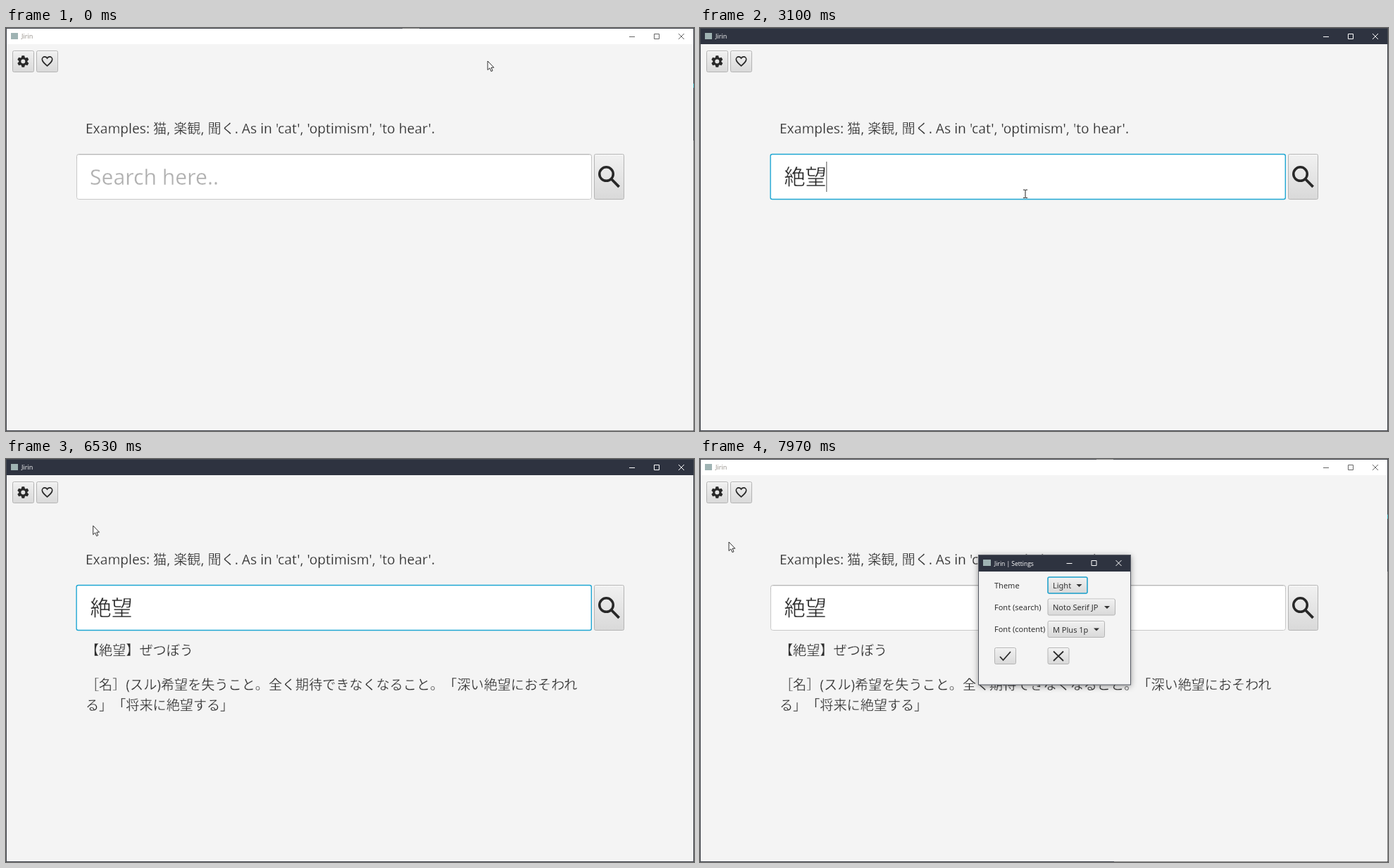
An HTML page that plays this animation: 977 by 573 pixels, repeating every 8 s.

```html
<!DOCTYPE html>
<html lang="en">
<head>
<meta charset="utf-8">
<title>Jirin</title>
<style>
  html, body { margin: 0; width: 100%; height: 100%; overflow: hidden; background: #f4f4f4; }
  svg { display: block; }
  text {
    font-family: "Noto Sans", "Noto Sans CJK JP", "Noto Sans CJK", sans-serif;
    font-weight: 350;
    fill: #2b2b2b;
    white-space: pre;
    text-spacing-trim: space-all;
  }
  /* A thin outline in the background colour makes the strokes finer. */
  .body { font-size: 19.12px; stroke: #f4f4f4; stroke-width: .3px; }
  .field { font-size: 30px; stroke: #fff; stroke-width: .4px; }
  .title { font: 9px "Open Sans", sans-serif; }
  .ui { font-size: 11px; font-weight: 400; fill: #333; }
  .glyph { fill: none; stroke: #282828; }
</style>
</head>
<body>
<svg id="stage" width="977" height="573" viewBox="0 0 977 573" lang="ja">
  <defs>
    <linearGradient id="face" x2="0" y2="1"><stop stop-color="#f1f1f1"/><stop offset="1" stop-color="#d9d9d9"/></linearGradient>
    <linearGradient id="lit" x2="0" y2="1"><stop stop-color="#fdfdfd"/><stop offset="1" stop-color="#ececec"/></linearGradient>
    <linearGradient id="pressed" x2="0" y2="1"><stop stop-color="#d2d2d2"/><stop offset="1" stop-color="#c4c4c4"/></linearGradient>
    <linearGradient id="edge" x2="0" y2="1"><stop stop-color="#b6b6b6"/><stop offset=".15" stop-color="#c8c8c8"/><stop offset="1" stop-color="#c8c8c8"/></linearGradient>
    <filter id="shadow" x="-10%" y="-10%" width="120%" height="125%"><feDropShadow dx="0" dy="2" stdDeviation="4" flood-opacity=".4"/></filter>
  </defs>
</svg>
<script>
const LOOP = 8000, FOCUS = 530, COMMIT = 3100, RESULT = 5130, PRESS = 7600, OPEN = 7670;
const DARK = "#2e3340", BLUE = "#1fa6d2";

const rect = (x, y, w, h, attrs = "") => `<rect x="${x}" y="${y}" width="${w}" height="${h}" ${attrs}/>`;
const path = (d, attrs = "") => `<path d="${d}" ${attrs}/>`;
const text = (x, y, cls, s, attrs = "") => `<text x="${x}" y="${y}" class="${cls}" ${attrs}>${s}</text>`;
const group = (id, s, attrs = "") => `<g id="${id}" ${attrs}>${s}</g>`;

const button = (x, y, w, h, id = "", stroke = "#b4b4b4") =>
  rect(x + .5, y + .5, w - 1, h - 1, `rx="2" fill="url(#face)" stroke="${stroke}" ${id && `id="${id}"`}`) +
  path(`M${x + 2} ${y + 1.5}h${w - 4}`, 'stroke="#fff" stroke-opacity=".7"');

// Minimise, maximise and close signs; x, y is the centre of the middle one.
const controls = (x, y, color) => path(
  `M${x - 39} ${y + .5}h8M${x - 3.5} ${y - 3.5}h7v7h-7zM${x + 31} ${y - 4}l8 8m0-8l-8 8`,
  `fill="none" stroke="${color}"`);

const titleBar = (id, bg, fg, sign) => group(id,
  rect(0, 0, 977, 23, `fill="${bg}"`) + rect(7, 7, 10, 9, 'fill="#9fb3b3"') +
  text(22, 15, "title", "Jirin", `style="fill:${fg}"`) + controls(924, 12, sign));

const gear = () => {
  const teeth = [0, 1, 2, 3, 4, 5].map(i =>
    path("M-2.7-5L-1.8-8.2H1.8L2.7-5z", `fill="#282828" transform="rotate(${i * 60})"`)).join("");
  return group("gear", '<circle r="4.5" class="glyph" stroke-width="3"/>' + teeth, 'transform="translate(24.3 47.5)"');
};

const heart = path(
  "M12 20.2C5.4 14.3 3 12 3 8.5A4.5 4.5 0 0 1 7.5 4C9.2 4 11 5 12 6.6 13 5 14.8 4 16.5 4A4.5 4.5 0 0 1 21 8.5C21 12 18.6 14.3 12 20.2Z",
  'class="glyph" stroke-width="2" transform="translate(48.9 37.7) scale(.8)"');

const lens = '<circle cx="852.5" cy="207.6" r="9.75" class="glyph" stroke-width="3.5"/>' +
  path("M859.4 214.5L870.6 225.8", 'class="glyph" stroke-width="3.8"');

const combo = (y, w, label, stroke) =>
  button(493.5, y, w, 24, "", stroke) + text(501, y + 16.5, "ui", label) +
  path(`M${493.5 + w - 16} ${y + 10.5}h8l-4 4z`, 'fill="#333"');

const dialog = group("dialog",
  rect(395, 136, 217, 185, 'fill="#f4f4f4" filter="url(#shadow)"') +
  rect(395, 136, 217, 24, `fill="${DARK}"`) +
  rect(395.5, 136.5, 216, 184.5, 'fill="none" stroke="#555963"') +
  rect(402, 143, 11, 9, 'fill="#9fb3b3"') +
  text(418, 151.5, "title", "Jirin | Settings", 'style="fill:#fff;font-size:8.5px"') +
  controls(559.5, 148, "#fff") +
  text(418, 184, "ui", "Theme") + text(418, 215, "ui", "Font (search)") + text(418, 246, "ui", "Font (content)") +
  combo(167.5, 57, "Light") + rect(494, 168, 56, 23, `rx="2" fill="none" stroke="${BLUE}" stroke-width="1.5"`) +
  combo(198.5, 96.5, "Noto Serif JP") + combo(230, 81.5, "M Plus 1p") +
  button(418, 268, 31, 24) + button(493.5, 268, 31, 24) +
  path("M426 281l4.5 5 10.5-12", 'class="glyph" stroke-width="1.8"') +
  path("M502 273.5l14 13.5m0-13.5l-14 13.5", 'class="glyph" stroke-width="1.8"'));

const stage = document.getElementById("stage");
stage.insertAdjacentHTML("beforeend",
  rect(0, 0, 977, 573, 'fill="#f4f4f4"') +
  titleBar("idleBar", "#fff", "#8f8982", "#666") + titleBar("activeBar", DARK, "#fff", "#fff") +
  rect(.5, .5, 976, 572, 'fill="none" stroke="#454850"') +
  group("idleEdge", path("M563 .5h24M588 572.5h388M976.5 160v412", 'stroke="#858585"') +
    path("M976.5 79v6", 'stroke="#36a9b5"')) +
  path("M0 572.5h83", 'stroke="#8d9097" id="imeEdge"') +
  button(9, 32, 31, 31, "gearFace") + gear() + button(43, 32, 31, 31) + heart +
  text(113, 150.3, "body", "Examples: 猫, 楽観, 聞く. As in 'cat', 'optimism', 'to hear'.") +
  group("plainField", rect(100.5, 179.5, 731, 64, 'rx="3" fill="#fff" stroke="url(#edge)"') +
    path("M102 180.5h728", 'stroke="#e6e6e6"')) +
  rect(100.1, 179.5, 731.2, 64, `id="focusField" rx="2.5" fill="#fff" stroke="${BLUE}" stroke-width="1.4"`) +
  text(119, 222.6, "field", "Search here..", 'id="prompt" style="fill:#b0b0b0"') +
  text(119.5, 222.2, "field", "", 'id="entry"') +
  rect(119, 228, 0, 1.4, 'id="underline" fill="#2b2b2b"') + rect(0, 190, 1, 43, 'id="caret" fill="#555"') +
  button(835, 179, 43, 65) + lens +
  group("result", text(113, 279.3, "body", "【絶望】ぜつぼう") +
    text(113, 328, "body", "［名］(スル)希望を失うこと。全く期待できなくなること。「深い絶望におそわれ") +
    text(113, 356.7, "body", "る」「将来に絶望する」")) +
  dialog +
  path("M0 0V12.6L2.9 9.9 4.9 14.6 7 13.7 5 9.2H8.8Z", 'id="arrow" fill="#fff" stroke="#1a1a1a" stroke-width=".9"') +
  path("M-3-5.7h2.2L0-5 .8-5.7H3M0-5V5M-3 5.7h2.2L0 5 .8 5.7H3", 'id="beam" fill="none" stroke="#222"'));

const el = {};
stage.querySelectorAll("[id]").forEach(e => el[e.id] = e);
const show = (id, on) => el[id].setAttribute("visibility", on ? "visible" : "hidden");

const typed = [[0, ""], [1430, "ｚ"], [1670, "ぜ"], [1900, "ぜｔ"], [2100, "ぜつ"], [2170, "ぜつｂ"],
  [2370, "ぜつぼ"], [2630, "ぜつぼう"], [2670, "絶望"]];

// Pointer stops: time, x, y, and whether the way there is eased.
const stops = [[0, 684, 47], [30, 684, 47], [500, 462, 235.8, 1], [4570, 462, 235.8], [4900, 344, 209, 1],
  [5100, 344, 209], [5900, 320, 329, 1], [6530, 124, 95], [6730, 66, 72], [7480, 22, 51, 1],
  [7700, 22, 51], [7970, 41, 118, 1], [LOOP, 41, 118]];

function pointer(t) {
  const i = stops.findIndex(s => s[0] > t);
  const [t0, x0, y0] = stops[i - 1], [t1, x1, y1, eased] = stops[i];
  let p = (t - t0) / (t1 - t0);
  if (eased) p = p * p * (3 - 2 * p);
  return [x0 + (x1 - x0) * p, y0 + (y1 - y0) * p];
}

const inside = (x, y, l, t, r, b) => x >= l && x < r && y >= t && y < b;

function caretOn(t) {
  if (t < FOCUS || t >= PRESS) return false;
  if (t < 1430) return t < 1030;
  return t < RESULT || Math.floor((t - RESULT) / 500) % 2 === 1;
}

function render(t) {
  const active = t >= FOCUS && t < OPEN, focused = t >= FOCUS && t < PRESS;
  show("activeBar", active);
  show("idleBar", !active);
  show("idleEdge", !active);
  show("imeEdge", t >= 1430 && t < 2670);
  show("focusField", focused);
  show("plainField", !focused);
  show("prompt", t < FOCUS);
  show("result", t >= RESULT);

  const entry = typed.filter(s => s[0] <= t).pop()[1];
  if (el.entry.textContent !== entry) el.entry.textContent = entry;
  el.underline.setAttribute("width", Math.max(0, entry.length * 30 - 2));
  show("underline", entry && t < COMMIT);
  el.caret.setAttribute("x", 119.3 + entry.length * 30);
  show("caret", caretOn(t));

  const [x, y] = pointer(t);
  const onField = inside(x, y, 100, 179, 832, 244), onGear = inside(x, y, 9, 32, 40, 63);
  const pressed = t >= PRESS && t < OPEN;
  show("beam", onField);
  show("arrow", !onField);
  el[onField ? "beam" : "arrow"].setAttribute("transform", `translate(${x} ${y})`);
  el.gearFace.setAttribute("fill", `url(#${pressed ? "pressed" : onGear ? "lit" : "face"})`);
  el.gearFace.setAttribute("stroke", pressed ? BLUE : "#b4b4b4");
  el.gear.setAttribute("opacity", onGear ? .8 : 1);

  const p = Math.min(1, Math.max(0, (t - OPEN) / 220)), e = 1 - (1 - p) ** 2, s = .945 + .055 * e;
  show("dialog", p > 0);
  el.dialog.setAttribute("opacity", e);
  el.dialog.setAttribute("transform", `translate(503 228.5) scale(${s}) translate(-503 -228.5)`);
}

const start = performance.now();
function tick() {
  render((performance.now() - start) % LOOP);
  requestAnimationFrame(tick);
}
tick();
</script>
</body>
</html>
```
